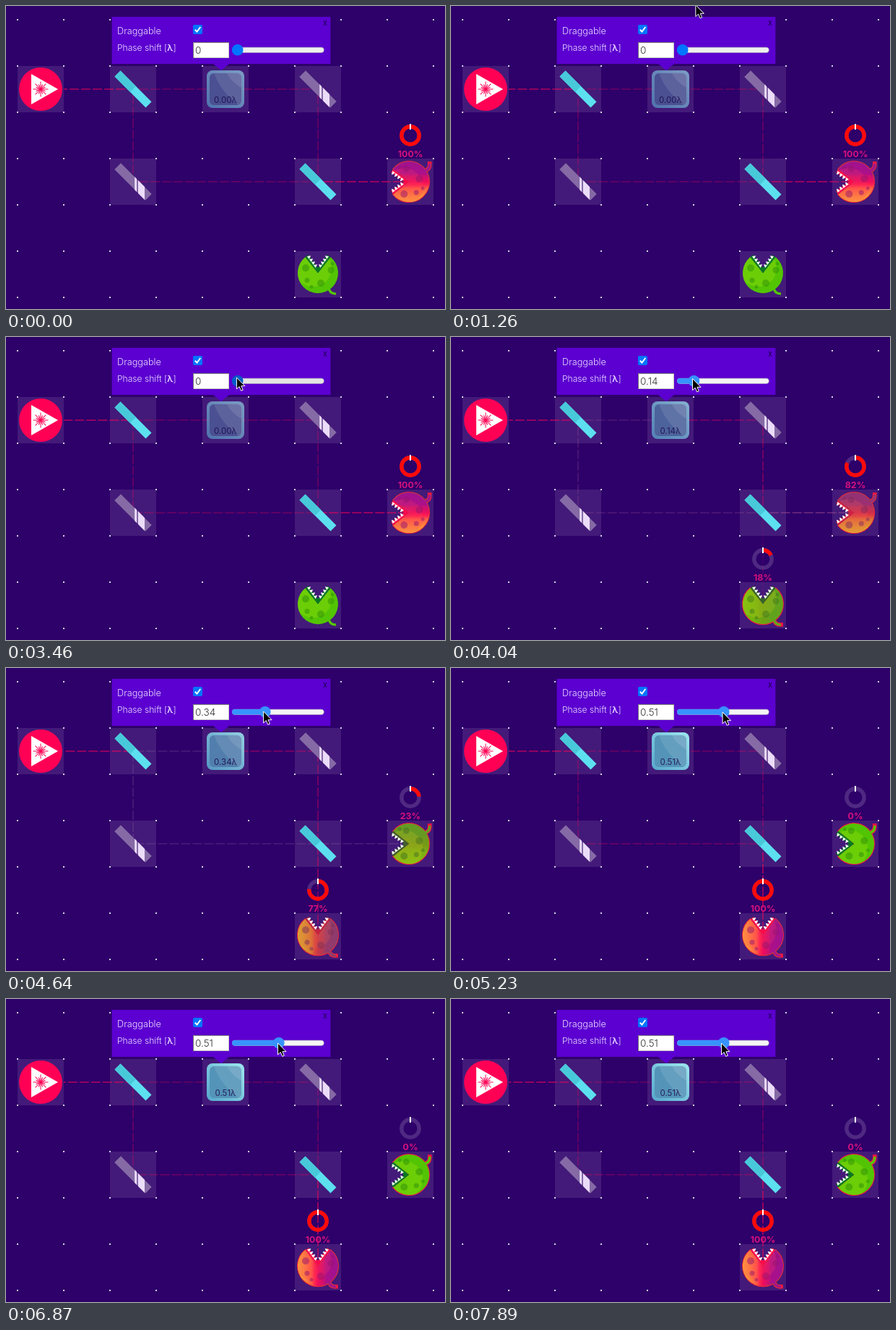
Write an HTML page that moves like this. It is 608 by 419 pixels and loops after 8 s.

```html
<!DOCTYPE html>
<html lang="en">
<head>
<meta charset="utf-8">
<title>Interferometer</title>
<style>
html, body { margin: 0; width: 100%; height: 100%; overflow: hidden; background: #2e006a; }
svg { display: block; width: 608px; height: 419px; font-family: Inter, Roboto, sans-serif; }
</style>
</head>
<body>
<svg id="stage" viewBox="0 0 608 419" xmlns="http://www.w3.org/2000/svg">
  <defs>
    <linearGradient id="heat" gradientUnits="userSpaceOnUse" x1="0" y1="-28" x2="0" y2="28">
      <stop offset="0" stop-color="#a0128f"/>
      <stop offset=".3" stop-color="#ac108a"/>
      <stop offset=".36" stop-color="#cc1072"/>
      <stop offset=".5" stop-color="#ee0d5c"/>
      <stop offset=".58" stop-color="#ff2450"/>
      <stop offset=".66" stop-color="#ff5c46"/>
      <stop offset=".84" stop-color="#ff8a3e"/>
      <stop offset="1" stop-color="#ffa83a"/>
    </linearGradient>
    <linearGradient id="glass" x1="0" y1="1" x2="1" y2="0">
      <stop offset="0" stop-color="#58aed0"/>
      <stop offset="1" stop-color="#a2f2f5"/>
    </linearGradient>
    <clipPath id="bodyClip"><path d="M-23-17.5A28 28 0 1 1-23 17.5L-1 0Z"/></clipPath>
    <clipPath id="barClip"><path d="M-17-26 26 17 17 26-26-17Z"/></clipPath>
    <clipPath id="plateClip"><rect x="-22" y="-22" width="44" height="44" rx="6"/></clipPath>
  </defs>
</svg>
<script>
const NS = "http://www.w3.org/2000/svg";
const stage = document.getElementById("stage");
const LOOP = 8000;
const RED = "#ff0055";

function add(parent, tag, attrs = {}, text) {
  const el = document.createElementNS(NS, tag);
  set(el, attrs);
  if (text !== undefined) el.textContent = text;
  parent.appendChild(el);
  return el;
}
function set(el, attrs) {
  for (const k in attrs) el.setAttribute(k, attrs[k]);
}
const group = (x, y, parent = stage) => add(parent, "g", { transform: `translate(${x} ${y})` });
const mix = (a, b, k) => a + (b - a) * k;
const blend = (a, b, k) => `rgb(${a.map((v, i) => Math.round(mix(v, b[i], k)))})`;

// Piecewise linear track: rows of [time, ...values]
function track(rows, t) {
  if (t <= rows[0][0]) return rows[0].slice(1);
  for (let i = 1; i < rows.length; i++) {
    const a = rows[i - 1], b = rows[i];
    if (t < b[0]) {
      const k = (t - a[0]) / (b[0] - a[0]);
      return a.slice(1).map((v, j) => mix(v, b[j + 1], k));
    }
  }
  return rows[rows.length - 1].slice(1);
}

// Board
for (let y = 19; y < 419; y += 64)
  for (let x = 16; x < 608; x += 64)
    add(stage, "rect", { x: x - 1, y: y - 1, width: 2, height: 2, fill: "#d9d0e8" });
const cells = [[48, 115], [176, 115], [304, 115], [432, 115], [176, 243], [432, 243], [560, 243], [432, 371]];
for (const [x, y] of cells)
  add(stage, "rect", { x: x - 32, y: y - 32, width: 64, height: 64, fill: "#fff", "fill-opacity": .1 });

// Beams
const beamLayer = add(stage, "g", { "stroke-width": 1.6, "stroke-dasharray": "13 3", fill: "none" });
const beam = d => add(beamLayer, "path", { d });
const beams = {
  input: beam("M80 115H176"),
  upper: beam("M176 115H304"),
  shifted: beam("M304 115H432V243"),
  lower: beam("M176 115V243H432"),
  right: beam("M432 243H556"),
  down: beam("M432 243V367")
};

// Optical parts
function laser(x, y) {
  const g = group(x, y);
  add(g, "circle", { r: 30, fill: RED });
  add(g, "path", { d: "M-13-21 24 0-13 21Z", fill: "#fff" });
  for (let i = 0; i < 16; i++) {
    const r = i % 2 ? 7 : 10.5;
    add(g, "path", { d: `M0 0H${r}`, stroke: RED, "stroke-width": 1, transform: `rotate(${i * 22.5})` });
  }
}
function splitter(x, y) {
  const g = group(x, y);
  add(g, "path", { d: "M-17.5-25.5 25.5 17.5 17.5 25.5-25.5-17.5Z", fill: "#5ce0f0" });
  add(g, "path", { d: "M-17.5-25.5 4-4-4 4-25.5-17.5Z", fill: "#48c9da" });
}
function mirror(x, y) {
  const g = add(group(x, y), "g", { "clip-path": "url(#barClip)" });
  add(g, "path", { d: "M-17-26 26 17 17 26-26-17Z", fill: "#856aa5" });
  add(g, "path", { d: "M2.2-30H5V30H2.2ZM7-30H16V30H7Z", fill: "#ebdcfa" });
}
function plate(x, y) {
  const g = group(x, y);
  const rim = add(g, "rect", { x: -26, y: -26, width: 52, height: 52, rx: 8, fill: "url(#glass)" });
  const core = add(g, "rect", { x: -22, y: -22, width: 44, height: 44, rx: 6 });
  const shine = add(g, "g", { "clip-path": "url(#plateClip)", fill: "#fff" });
  add(shine, "path", { d: "M-16-22Q-6 4 18 22H22V-2Q8-10 2-22Z", "fill-opacity": .1 });
  add(shine, "path", { d: "M2-22Q8-10 22-2V-22Z", "fill-opacity": .2 });
  const label = add(g, "text", { y: 19, "text-anchor": "middle", "font-size": 11.5, fill: "#1b0a4a", "fill-opacity": .85 });
  return { rim, core, label };
}

laser(48, 115);
splitter(176, 115);
splitter(432, 243);
mirror(432, 115);
mirror(176, 243);
const shifter = plate(304, 115);

// Detectors
const BODY = "M-23-17.5A28 28 0 1 1-23 17.5L-1 0Z";
const TAIL = "M19-15Q28-16 27.5-25";
const SPOTS = [[-8, 17, 5], [-5, -18, 4.5], [13, -4, 5], [9, 15, 3.5], [-14, -20, 2.5], [18, 9, 2.5]];

function creature(parent, fill, spot, shine, lip, tail) {
  const g = add(parent, "g");
  add(g, "path", { d: TAIL, fill: "none", stroke: tail, "stroke-width": 3.2 });
  add(g, "path", { d: BODY, fill });
  const skin = add(g, "g", { "clip-path": "url(#bodyClip)" });
  add(skin, "circle", { cx: -8, cy: 7, r: 26, fill: shine, "fill-opacity": .22 });
  for (const [cx, cy, r] of SPOTS) add(skin, "circle", { cx, cy, r, fill: spot, "fill-opacity": .5 });
  add(g, "path", { d: "M-23-17.5-1 0-23 17.5-26 13-8 0-26-13Z", fill: lip });
  for (const side of [1, -1]) {
    const teeth = add(g, "g", { transform: `scale(1 ${side})` });
    for (let i = 0; i < 4; i++)
      add(teeth, "path", { d: "M0 0H4.6L2.3 4.8Z", fill: "#fff", transform: `translate(${-24 + i * 4} ${-15 + i * 3}) rotate(36.5)` });
  }
  return g;
}

function detector(x, y, turn) {
  const g = group(x, y);
  const body = add(add(g, "g", { transform: `rotate(${turn})` }), "g", { transform: "translate(-.7 0)" });
  const edge = add(body, "g", { fill: "none", stroke: "#f5163f" });
  add(edge, "path", { d: BODY, "stroke-width": 2 });
  add(edge, "path", { d: TAIL, "stroke-width": 5.6, "stroke-linecap": "square" });
  creature(body, "#52c404", "#2f8f08", "#c4f010", "#077a22", "#55c605");
  const hot = creature(body, "url(#heat)", "#961470", "#ff3a5a", "#ff0a4e", "#a4128e");
  const meter = group(0, -64, g);
  add(meter, "circle", { r: 12.2, fill: "none", stroke: "#fff", "stroke-opacity": .16, "stroke-width": 5.4 });
  const arc = add(meter, "circle", { r: 12.2, fill: "none", stroke: "#ff0a0a", "stroke-width": 5.4, pathLength: 100, transform: "rotate(-90)" });
  add(meter, "path", { d: "M0-16V-8", stroke: "#fff", "stroke-width": 2 });
  const label = add(meter, "text", { y: 30, "text-anchor": "middle", "font-size": 12.4, "font-weight": 700, fill: "#d4127c" });
  return p => {
    const shown = p > 0 ? "visible" : "hidden";
    set(edge, { visibility: shown });
    set(meter, { visibility: shown });
    set(hot, { opacity: p });
    set(arc, { "stroke-dasharray": `${p * 100} 101`, visibility: p > .005 ? "inherit" : "hidden" });
    label.textContent = Math.round(p * 100) + "%";
  };
}
const showRight = detector(560, 243, 0);
const showDown = detector(432, 371, 90);

// Settings panel
add(stage, "path", { d: "M146.6 15H449.4V80H309L298 89 287 80H146.6Z", fill: "#5b00d0" });
const caption = (y, size, text) =>
  add(stage, "text", { x: 154, y, "font-size": size, "font-weight": 300, fill: "#eadcff" }, text);
caption(39, 12.7, "Draggable");
const shiftLabel = caption(62, 12.1, "Phase shift [");
add(shiftLabel, "tspan", { "font-weight": 600 }, "λ");
add(shiftLabel, "tspan", {}, "]");
add(stage, "text", { x: 442, y: 27, "font-size": 11, "text-anchor": "middle", fill: "#1f0052" }, "x");
add(stage, "rect", { x: 259, y: 26, width: 13, height: 13, rx: 2, fill: "#0075ff" });
add(stage, "path", { d: "M261.8 32.8 264.5 35.5 269.3 29", fill: "none", stroke: "#fff", "stroke-width": 2 });
add(stage, "rect", { x: 259.5, y: 50.5, width: 49, height: 21, fill: "#fff", stroke: "#c4c4c4" });
add(stage, "path", { d: "M259.5 72V50.5H309", fill: "none", stroke: "#767676" });
const field = add(stage, "text", { x: 262, y: 66, "font-size": 13.6, "font-weight": 300, fill: "#333" });
const rail = add(stage, "rect", { x: 313.3, y: 57.2, width: 127, height: 7.2, rx: 3.6, stroke: "#b2b2b2", "stroke-width": .6 });
const fill = add(stage, "rect", { x: 313, y: 57, height: 7.6, rx: 3.8 });
const thumb = add(stage, "circle", { cy: 60.8, r: 7.8 });

const cursor = add(stage, "path", {
  d: "M0 0V16L3.7 12.6 6.2 18.3 8.8 17.2 6.4 11.7H11.5Z",
  fill: "#000", stroke: "#fff", "stroke-width": 1, "stroke-linejoin": "round"
});

// Timing: the picture refreshes in eight even ticks per block
const BLOCKS = [260, 1410, 2580, 3750, 4940, 6130, 7300, 8480];
const PHASE = [[3640, 0], [4640, .34], [5250, .51]];
const POINTER = [
  [1110, 344, -22], [1260, 339, -2], [1560, 331, 26], [1990, 320.6, 57.5], [2450, 320.6, 57.5],
  [2590, 319.4, 56], [3640, 319.4, 56], [4640, 356.5, 60], [5250, 376.5, 61], [7300, 376.5, 61], [7590, 374.5, 61]
];

function tick(t) {
  t += 8;
  if (t < BLOCKS[0]) return 0;
  const i = BLOCKS.findIndex(b => b > t) - 1;
  const step = (BLOCKS[i + 1] - BLOCKS[i]) / 8;
  return BLOCKS[i] + Math.floor((t - BLOCKS[i]) / step) * step;
}

function draw(time) {
  const t = tick(time);
  const phase = Math.round(track(PHASE, t)[0] * 100) / 100;
  const p = Math.cos(Math.PI * phase) ** 2;
  const active = t > 3640;
  const hover = t > 2500;

  const grey = Math.sin(2 * Math.PI * phase) ** 2;
  const tint = blend([255, 0, 85], [135, 105, 165], Math.min(1, grey * 1.3));
  set(beamLayer, { "stroke-dashoffset": 8 - t * .016 });
  set(beams.input, { stroke: RED, "stroke-opacity": .62 });
  set(beams.upper, { stroke: tint, "stroke-opacity": .29 });
  set(beams.lower, { stroke: tint, "stroke-opacity": .3 });
  set(beams.shifted, { stroke: RED, "stroke-opacity": mix(.3, .46, grey) });
  set(beams.right, { stroke: tint, "stroke-opacity": p < .005 ? 0 : mix(.22, .65, p) });
  set(beams.down, { stroke: RED, "stroke-opacity": p > .995 ? 0 : .62 * (1 - p) });

  const lit = Math.min(1, phase / .5);
  set(shifter.rim, { "fill-opacity": mix(.6, .95, lit) });
  set(shifter.core, { fill: blend([74, 80, 145], [84, 148, 184], lit) });
  shifter.label.textContent = phase.toFixed(2) + "λ";

  showRight(p);
  showDown(1 - p);

  const x = 320.7 + phase * 112;
  const blue = active ? "#3793ff" : hover ? "#005cc8" : "#0075ff";
  field.textContent = phase ? String(phase) : "0";
  set(rail, { fill: active ? "#f5f5f5" : hover ? "#e5e5e5" : "#efefef" });
  set(fill, { width: x - 313, fill: blue });
  set(thumb, { cx: x, fill: blue });

  const [cx, cy] = track(POINTER, t);
  set(cursor, { transform: `translate(${cx} ${cy})` });
}

const start = performance.now();
function loop() {
  draw((performance.now() - start) % LOOP);
  requestAnimationFrame(loop);
}
loop();
</script>
</body>
</html>
```
